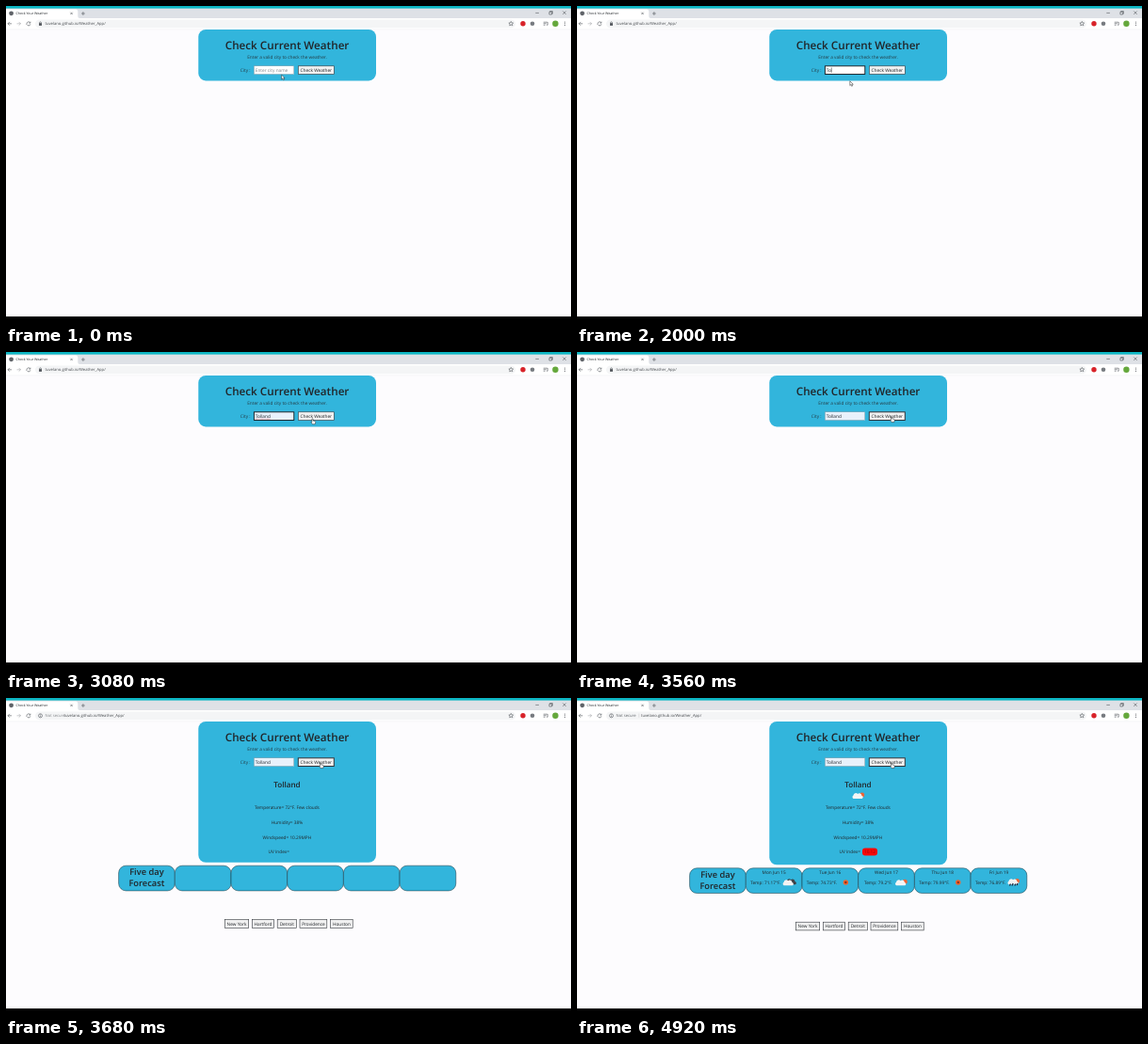
These frames come from a looping animation (600x338 px, 5000 ms). An HTML page:

```html
<!DOCTYPE html>
<html lang="en">
<head>
<meta charset="utf-8">
<title>Check Your Weather</title>
<style>
  html, body { margin: 0; width: 100%; height: 100%; overflow: hidden; background: #fdfcfe; }
  svg { display: block; width: 100%; height: 100%; }
  text { font: 4.76px "Open Sans", "Noto Sans", sans-serif; fill: #212529; text-rendering: geometricPrecision; }
  .mid { text-anchor: middle; }
  .heading { font-weight: 600; }
  .blue { fill: #32b5dc; }
  .line { fill: none; stroke: #50545a; stroke-width: .6; }
  .soft { opacity: .85; }
</style>
</head>
<body>
<svg viewBox="0 0 600 338" preserveAspectRatio="none">
  <defs>
    <g id="cloud"><path d="M-6 3.2a2 2 0 0 1 0-3.5a2.7 2.7 0 0 1 4.6-1.5a2.6 2.6 0 0 1 4.2 1.8a1.7 1.7 0 0 1 .5 3.2z"/></g>
    <g id="sun"><circle r="2.7" fill="#f0642d"/><circle r="1.2" fill="#8f321b"/></g>
    <g id="partly"><circle cx="3.2" cy="-.7" r="2.5" fill="#ee6537"/><use href="#cloud" fill="#f5f5f5"/></g>
    <g id="broken"><use href="#cloud" x="3" y="-1" fill="#3d4147"/><use href="#cloud" fill="#f2f2f2"/></g>
    <g id="rain"><circle cx="3" cy="-1.6" r="2.5" fill="#ee6537"/><use href="#cloud" y="-1" fill="#f2f2f2"/>
      <path d="M-4 1.5l-1 2M-1.3 1l-1.2 2.6M1.4 1.5l-1 2M3.5 1l-.8 2" stroke="#23283d" stroke-width="1.3"/></g>
  </defs>

  <g id="browser">
    <rect width="600" height="338" fill="#fdfcfe"/>
    <rect y="2" width="600" height="11" fill="#dee1e6"/>
    <rect width="600" height="2.6" fill="#0db7c4"/>
    <path d="M0 13V3.4H74q2.3 0 2.3 2.3V11q0 2 2 2z" fill="#fff"/>
    <rect y="13" width="600" height="11.8" fill="#fff"/>
    <rect x="31" y="14.4" width="510" height="8.8" rx="4.4" fill="#f4f5f6"/>
    <path d="M0 24.9H600" stroke="#e2e3e6" stroke-width=".3"/>
    <circle cx="5.6" cy="7.8" r="2.4" fill="#5f6368"/>
    <text x="10.5" y="9.1" style="font-size:3.58px">Check Your Weather</text>
    <path class="line" d="M68.4 6.7l2.3 2.3m0-2.3l-2.3 2.3M80 8h3.8m-1.9-1.9v3.8M562.3 7.4h3.6M576.9 6.3h2.7v2.7h-2.7zM577.7 6.3v-.8h2.7v2.7h-.8M591.3 5.5l3.4 3.4m0-3.4l-3.4 3.4"/>
    <path class="line" d="M6 18.8H2m1.9-1.9L2 18.8l1.9 1.9"/>
    <path class="line" opacity=".5" d="M11.5 18.8h4m-1.9-1.9l1.9 1.9l-1.9 1.9"/>
    <path class="line" d="M25.5 17.6a2 2 0 1 0 .4 1.7M25.9 16.6v1.5h-1.5"/>
    <path class="line" stroke-width=".4" d="M536.3 16.4l.7 1.5l1.7.2l-1.2 1.1l.3 1.6l-1.5-.8l-1.5.8l.3-1.6l-1.2-1.1l1.7-.2z"/>
    <circle cx="549" cy="18.8" r="2.7" fill="#d8232a"/>
    <circle cx="559" cy="18.8" r="2.3" fill="#777b80"/>
    <path class="line" d="M570.7 17.2h4.2m-4.2 1.5h3m-3 1.5h2M575.2 17v3.2h-1.2"/>
    <circle cx="583.4" cy="18.8" r="3.2" fill="#65a83c"/>
    <g fill="#50545a"><circle cx="593.5" cy="17" r=".5"/><circle cx="593.5" cy="18.8" r=".5"/><circle cx="593.5" cy="20.6" r=".5"/></g>
    <g id="lock"><rect x="35" y="18.2" width="3" height="2.6" fill="#50545a"/><path class="line" d="M35.6 18.3v-.6a.9.9 0 0 1 1.8 0v.6"/></g>
    <g id="info"><circle class="line" cx="36.5" cy="18.8" r="2"/><path class="line" d="M36.5 18.5v1.4m0-2.4v.5"/></g>
    <g id="insecure" style="opacity:0"><text x="41.5" y="20.3" style="font-size:4.16px;fill:#5f6368">Not secure</text>
      <path d="M65.8 16.7v4" stroke="#aaa" stroke-width=".3"/></g>
    <text id="url" y="20.3" style="font-size:4.16px;fill:#45494d">tuvelano.github.io/Weather_App/</text>
    <rect y="330" width="600" height="8"/>
  </g>

  <rect id="card" class="blue" x="204.3" y="25" width="188.7" rx="7.8"/>
  <text class="mid heading" x="298.6" y="45.5" style="font-size:11.7px">Check Current Weather</text>
  <text class="mid soft" x="298.6" y="56.4">Enter a valid city to check the weather.</text>
  <text class="soft" x="248.8" y="69.9">City :</text>
  <rect id="field" x="263.4" y="63.8" width="42.4" height="8.7"/>
  <text id="typed" x="264.8" y="69.8"></text>
  <path id="spelling" d="M265 71.1h16" stroke="#e04848" stroke-width=".5" stroke-dasharray=".8 .4"/>
  <path id="caret" stroke="#111" stroke-width=".5"/>
  <g id="submit"></g>

  <g id="results">
    <text class="mid heading" x="298.5" y="95" style="font-size:8.1px">Tolland</text>
    <text class="mid" x="298.4" y="118.1">Temperature= 72°F. Few clouds</text>
    <text class="mid" x="298.4" y="133.8">Humidity= 38%</text>
    <text class="mid" x="298.4" y="149.5">Windspeed= 10.29MPH</text>
    <text x="278.5" y="165.2">UV Index=</text>
    <g id="lower"></g>
  </g>
  <g id="details">
    <use href="#partly" x="299.5" y="103.7"/>
    <rect x="303" y="159.6" width="16" height="7.8" rx="3" fill="#f90808"/>
    <text class="mid" x="311" y="165.2" style="fill:#8e0c10">10.12</text>
  </g>
  <g id="pointer">
    <path id="arrow" d="M0 0v4.7l1.1-1l.8 1.8l.9-.4l-.8-1.7h1.5z" fill="#fff" stroke="#111" stroke-width=".45"/>
    <path id="beam" d="M-1 -2.3h2m-1 0v4.8m-1 0h2" fill="none" stroke="#222" stroke-width=".5"/>
    <path id="hand" d="M0 0q.6-.6 1.1 0v1.9l2.2.5q.6.2.5.9l-.5 2.3H.6L-1 3.4q.1-.8 1 .1z" fill="#fff" stroke="#111" stroke-width=".45"/>
  </g>
</svg>
<script>
const LOOP = 5000, SUBMITTED = 3600, LOADED = 3800;
const $ = id => document.getElementById(id);
const show = (id, on) => { $(id).style.display = on ? "" : "none"; };

const button = (x, y, w, label) =>
  `<rect x="${x}" y="${y}" width="${w}" height="8.7" fill="#f1f1f1" stroke="#30343a" stroke-width=".6"/>
   <text class="mid" x="${x + w / 2}" y="${y + 6}">${label}</text>`;

$("submit").innerHTML = button(310.3, 63.8, 38, "Check Weather");

const days = [
  ["Mon Jun 15", "71.17", "broken"], ["Tue Jun 16", "74.73", "sun"],
  ["Wed Jun 17", "79.2", "partly"], ["Thu Jun 18", "79.99", "sun"], ["Fri Jun 19", "76.89", "rain"]
];
const cellWidth = 59.7;
const cellX = i => 119.6 + i * cellWidth;
const cells = Array.from({ length: 6 }, (_, i) =>
  `<rect class="blue" x="${cellX(i)}" y="178.2" width="${cellWidth}" height="26.7" rx="7.8" stroke="#17303a" stroke-width=".5"/>`);
const forecast = days.map(([day, temp, icon], i) => {
  const center = cellX(i + 1) + cellWidth / 2;
  return `<text class="mid" x="${center}" y="184.1">${day}</text>
    <text class="mid" x="${center - 8.8}" y="195.1">Temp: ${temp}°F.</text>
    <use href="#${icon}" x="${center + 16.5}" y="193.4"/>`;
});
const cities = [
  [232.3, 25.4, "New York"], [261.4, 23.2, "Hartford"], [288.2, 20.3, "Detroit"],
  [312, 28.8, "Providence"], [344.6, 23.6, "Houston"]
];
$("lower").innerHTML = cells.join("") +
  `<g class="heading"><text class="mid" x="149.4" y="188.2" style="font-size:9.3px;font-weight:600">Five day</text>
   <text class="mid" x="149.4" y="200" style="font-size:9.3px;font-weight:600">Forecast</text></g>
   <g id="forecast">${forecast.join("")}</g>` +
  cities.map(([x, w, name]) => button(x, 235.6, w, name)).join("");

const progress = (t, from, to) => {
  const p = Math.min(1, Math.max(0, (t - from) / (to - from)));
  return p * p * (3 - 2 * p);
};

// Each move: start, end, destination x and y.
const moves = [[0, 320, 293, 69], [1560, 1800, 289.8, 79.8], [2680, 3240, 333.5, 69]];
function pointerAt(t) {
  let x = 292.6, y = 73.2;
  for (const [from, to, endX, endY] of moves) {
    const p = progress(t, from, to);
    x += (endX - x) * p;
    y += (endY - y) * p;
  }
  return [x, y];
}

function draw(t) {
  const submitted = t >= SUBMITTED, loaded = t >= LOADED;
  const focused = t >= 1520 && t < 3320;
  const count = t < 1840 ? 0 : Math.min(7, 1 + Math.floor((t - 1840) / 110));
  const typed = $("typed");
  typed.textContent = count ? "Tolland".slice(0, count) : "Enter city name";
  typed.style.fill = count ? "#20252b" : "#80868b";
  $("field").setAttribute("fill", count === 7 ? "#e8f1fb" : "#fff");
  $("field").setAttribute("stroke", focused ? "#15191e" : "#7d8b94");
  $("field").setAttribute("stroke-width", focused ? .9 : .4);
  $("submit").firstElementChild.setAttribute("stroke-width", t >= 3320 ? 1 : .6);
  const caretX = count ? 265.1 + typed.getComputedTextLength() : 265;
  $("caret").setAttribute("d", `M${caretX} 65.5v5.3`);
  show("caret", focused && (t - 1520) % 1000 < 500 || focused && count > 0 && t < 2900);
  show("spelling", focused && count === 7);

  show("results", submitted);
  show("details", loaded);
  show("forecast", loaded);
  $("card").setAttribute("height", loaded ? 152.3 : submitted ? 149.7 : 54.4);
  $("lower").setAttribute("transform", `translate(0 ${loaded ? 2.6 : 0})`);

  const warning = progress(t, SUBMITTED, 3720);
  show("lock", !submitted);
  show("info", submitted);
  $("insecure").style.opacity = warning;
  $("url").setAttribute("x", 41.5 + 26.5 * warning);

  const [x, y] = pointerAt(t);
  $("pointer").setAttribute("transform", `translate(${x} ${y})`);
  const overField = x < 306 && y < 72.5, overButton = x > 310 && y < 72.5;
  show("beam", overField);
  show("hand", overButton);
  show("arrow", !overField && !overButton);
}

function tick() {
  draw(performance.now() % LOOP);
  requestAnimationFrame(tick);
}
tick();
</script>
</body>
</html>
```
